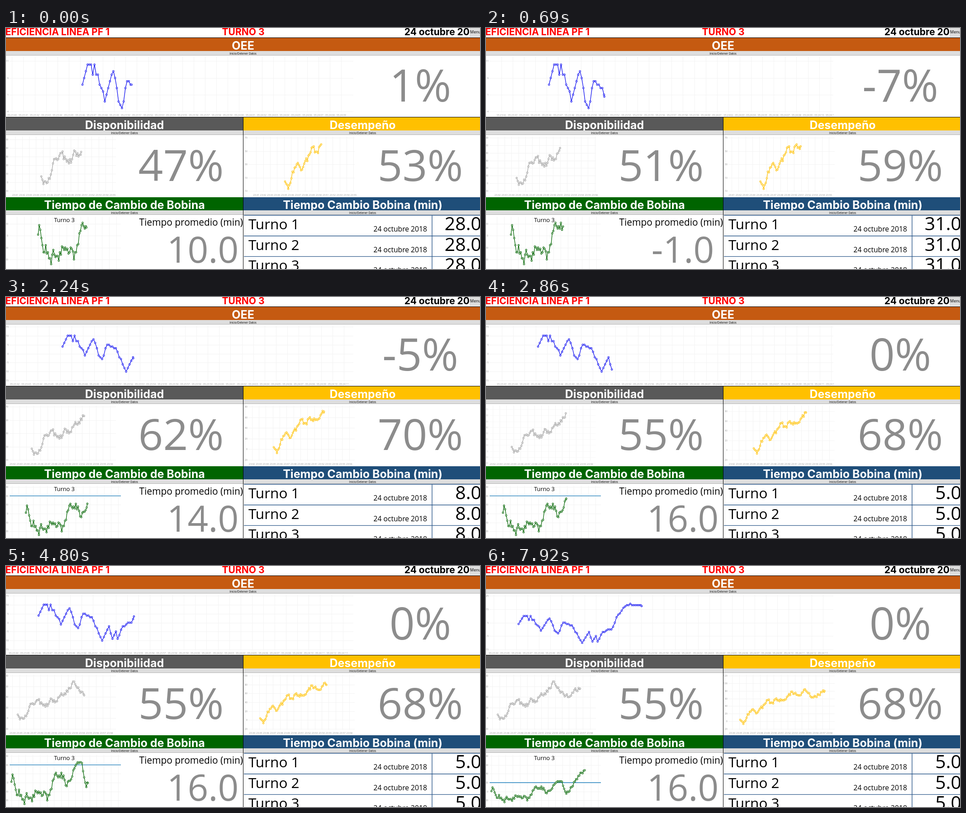
Write an HTML page with a canvas that moves like this. It is 1048 by 534 pixels and loops after 8 s.

```html
<!DOCTYPE html>
<html lang="es">
<head>
<meta charset="utf-8">
<style>
  html, body { margin: 0; width: 100%; height: 100%; overflow: hidden; background: #fff; }
  canvas { display: block; }
</style>
</head>
<body>
<canvas id="stage" width="1048" height="534"></canvas>
<script>
const ctx = document.getElementById('stage').getContext('2d');
const LOOP = 8000, RESCALE = 150, SLOWDOWN = 2560;
const SANS = '"Open Sans", "Noto Sans", sans-serif';
const HEAD = 'Inter, "Open Sans", sans-serif';
const GRID = '#f3f3f3', BIG = '#8c8c8c', RULE = '#2f5b8c';

const readings = [
  { from: 0,    oee: '1%',  avail: '47%', perf: '53%', mean: '10.0', change: '28.0' },
  { from: 310,  oee: '-7%', avail: '51%', perf: '59%', mean: '-1.0', change: '31.0' },
  { from: 2240, oee: '-5%', avail: '62%', perf: '70%', mean: '14.0', change: '8.0' },
  { from: 2460, oee: '0%',  avail: '55%', perf: '68%', mean: '16.0', change: '5.0' }
];

// shape: [sample, value]   scroll: [time, x of first sample]
// scales: [time, low, high, label step]   rate: new samples per second
const oee = {
  color: '#0a0af0', box: [0, 61, 770, 136], plot: [8, 768], top: 66, bottom: 185, axisX: 6,
  step: 3.8, second: 25.1, start: 46.2, prefix: '05:', labelY: 195,
  initial: 28.6, rate: 5.6, jitter: .8,
  scroll: [[0, 169], [690, 137], [2240, 125], [3560, 84], [4400, 72]],
  scales: [[0, -4, 12, 5], [1290, -15, 15, 5], [5120, -15, 20, 5], [6900, -15, 25, 10]],
  shape: [[0, 4], [3, 10], [5, 10], [6, 7], [7, 10], [13, -1], [16, 5], [18, 8], [21, -1],
    [23, -3], [26, 5], [29, 4], [32, 1], [37, -10], [41, -2], [43, -9], [45, -5], [46, -9],
    [49, -2], [54, 0], [58, 11], [63, 18], [73, 18]]
};
const avail = {
  color: '#a3a3a3', box: [0, 238, 250, 136], plot: [8, 243], top: 243, bottom: 361, axisX: 5,
  step: 2.35, second: 15.36, start: 44.75, prefix: '', labelY: 372,
  initial: 37.5, rate: 5.2, jitter: 4,
  scroll: [[0, 78], [690, 67], [2240, 57], [3560, 57], [4400, 26]],
  scales: [[0, -10, 52, 10], [460, -10, 60, 10], [2070, -10, 70, 20], [2480, -20, 80, 20]],
  shape: [[0, 7], [2, -2], [9, 9], [11, 22], [19, 34], [26, 22], [32, 36], [35, 30], [40, 43],
    [47, 50], [52, 69], [54, 64], [58, 52], [63, 41], [69, 43], [72, 53], [82, 56]]
};
const perf = {
  color: '#ffc000', box: [525, 238, 250, 136], plot: [536, 771], top: 243, bottom: 361, axisX: 534,
  step: 2.35, second: 15.36, start: 45.15, prefix: '', labelY: 372,
  initial: 34, rate: 5.9, jitter: 4,
  scroll: [[0, 617], [690, 606], [2240, 592], [3560, 592], [4400, 562]],
  scales: [[0, -10, 70, 20], [2070, -20, 80, 20], [2480, -20, 100, 20], [7500, -20, 120, 20]],
  shape: [[0, 4], [3, -7], [7, 19], [11, 30], [16, 22], [26, 56], [31, 47], [33, 58], [41, 55],
    [45, 67], [49, 78], [53, 70], [57, 69], [60, 83], [68, 63], [74, 70], [82, 87]]
};
const coil = {
  color: '#006400', box: [0, 415, 258, 119], plot: [8, 254], top: 421, bottom: 539, axisX: 5,
  step: 2.4, second: 15.7, start: 45, prefix: '', labelY: 550, limit: 20,
  initial: 44.5, rate: 5.4, jitter: 3.5,
  scroll: [[0, 71], [690, 54], [2240, 44], [3560, 17], [4800, 12]],
  scales: [[0, -30, 15, 10], [2070, -30, 30, 10], [6880, -40, 80, 20]],
  shape: [[0, 1], [1, 9], [5, -14], [7, -8], [12, -24], [14, -12], [19, -21], [22, -9],
    [28, -15], [30, -10], [33, -20], [40, 9], [48, 8], [51, -4], [56, 7], [59, 19], [65, 22],
    [69, -5], [74, 10], [82, 42], [90, 51]]
};

const mix = (a, b, p) => a + (b - a) * p;

// piecewise linear value through [position, value] pairs
function along(keys, at) {
  const i = Math.max(0, keys.findLastIndex(k => k[0] <= at));
  const a = keys[i], b = keys[i + 1];
  return b ? mix(a[1], b[1], (at - a[0]) / (b[0] - a[0])) : a[1];
}
// repeatable noise in -1..1
function noise(i) {
  const n = Math.sin(i * 127.1 + 3.7) * 43758.5453;
  return 2 * (n - Math.floor(n)) - 1;
}
const sample = (c, i) => {
  const isKey = c.shape.some(k => k[0] === i);
  return Math.round(along(c.shape, i) + (isKey ? 0 : c.jitter * noise(i)));
};

function text(str, x, y, size, color = '#000', align = 'center', weight = 400, family = SANS) {
  ctx.font = `${weight} ${size}px ${family}`;
  ctx.fillStyle = color;
  ctx.textAlign = align;
  ctx.fillText(str, x, y);
}
function rect(x, y, w, h, color) {
  ctx.fillStyle = color;
  ctx.fillRect(x, y, w, h);
}
function line(x1, y1, x2, y2, color, width = 1) {
  ctx.strokeStyle = color;
  ctx.lineWidth = width;
  ctx.beginPath();
  ctx.moveTo(x1, y1);
  ctx.lineTo(x2, y2);
  ctx.stroke();
}
function banner(title, x, y, w, h, color) {
  const mid = x + w / 2, strip = y + h;
  rect(x, y, w, h, color);
  text(title, mid, strip - 3.5, 25, '#fff', 'center', 700, HEAD);
  rect(x, strip, w, 10, '#dedede');
  rect(x, strip + 9, w, 1, '#b4b4b4');
  text('Inicio/Detener Datos', mid, strip + 7.5, 6.2);
}

function drawChart(c, t) {
  const x0 = along(c.scroll, t);
  const last = c.initial + c.rate * t / 1000;
  const si = c.scales.findLastIndex(s => s[0] <= t);
  const now = c.scales[si], old = c.scales[si - 1] || now;
  const p = si ? Math.min(1, (t - now[0]) / RESCALE) : 1;
  const toY = (v, [, low, high]) => mix(c.bottom, c.top, (v - low) / (high - low));
  const yOf = v => mix(toY(v, old), toY(v, now), p);

  ctx.save();
  ctx.beginPath();
  ctx.rect(...c.box);
  ctx.clip();

  for (let s = 35; s < 80; s++) {
    const x = x0 + (s - c.start) * c.second;
    if (x < c.plot[0] + 3 || x > c.plot[1] - 2) continue;
    rect(Math.round(x), c.top - 3, 1, c.bottom - c.top + 5, GRID);
    const clock = `${23 + Math.floor(s / 60)}:${String(s % 60).padStart(2, '0')}`;
    text(c.prefix + clock, x, c.labelY, 5.3, '#999');
  }
  for (const [scale, alpha] of [[old, 1 - p], [now, p]]) {
    ctx.globalAlpha = alpha;
    for (let v = scale[1]; v <= scale[2] && alpha; v += scale[3]) {
      rect(c.plot[0], Math.round(yOf(v)), c.plot[1] - c.plot[0], 1, GRID);
      text(v, c.axisX, yOf(v) + 2, 5.5, '#999', 'right');
    }
  }
  ctx.globalAlpha = 1;
  if (c.limit) line(c.plot[0], yOf(c.limit), c.plot[1], yOf(c.limit), '#1c7fbd', 1.3);

  // the newest sample slides out of the one before it
  const points = [];
  for (let i = 0; i < last + 1; i++) {
    const grow = Math.min(1, last - i + 1);
    const v = mix(sample(c, Math.max(0, i - 1)), sample(c, i), grow);
    points.push([x0 + Math.min(i, last) * c.step, yOf(v)]);
  }
  ctx.strokeStyle = c.color;
  ctx.lineWidth = 1.25;
  ctx.lineJoin = 'round';
  ctx.beginPath();
  points.forEach(q => ctx.lineTo(...q));
  ctx.stroke();
  ctx.fillStyle = '#fff';
  ctx.lineWidth = 1.1;
  for (const [x, y] of points) {
    ctx.beginPath();
    ctx.arc(x, y, 1.7, 0, 7);
    ctx.fill();
    ctx.stroke();
  }
  ctx.restore();
}

function drawFrame(t) {
  const r = readings.findLast(item => item.from <= t);
  rect(0, 0, 1048, 534, '#fff');

  text('EFICIENCIA LINEA PF 1', 229, 16, 21, '#f00', 'right', 700, HEAD);
  text('TURNO 3', 524.5, 16, 21, '#f00', 'center', 700, HEAD);
  text('24 octubre 20', 1025, 16, 21, '#000', 'right', 700, HEAD);
  rect(1025, 0, 23, 20, '#ddd');
  text('Menu', 1026, 12, 9, '#000', 'left');
  rect(0, 21, 1048, 1, '#000');

  banner('OEE', 0, 22, 1048, 29, '#c55a11');
  drawChart(oee, t);
  text(r.oee, 916, 163, 98, BIG);

  rect(0, 197, 1048, 1, '#000');
  banner('Disponibilidad', 0, 198, 524, 29, '#595959');
  banner('Desempeño', 525, 198, 527, 29, '#ffc000');
  drawChart(avail, t);
  drawChart(perf, t);
  text(r.avail, 387, 339, 96, BIG);
  text(r.perf, 916, 339, 96, BIG);

  banner('Tiempo de Cambio de Bobina', 0, 375, 524, 29, '#006400');
  banner('Tiempo Cambio Bobina (min)', 525, 375, 527, 29, '#1f4e79');
  drawChart(coil, t);
  text('Turno 3', 129, 430, 12.8);
  text('Tiempo promedio (min)', 524, 438, 20.9, '#000', 'right');
  text(r.mean, 435, 520, 80, BIG);

  for (let row = 0; row < 3; row++) {
    const y = 415 + row * 45.7;
    line(526, y, 1048, y, RULE, 1.4);
    text('Turno ' + (row + 1), 536, y + 31, 31.5, '#000', 'left');
    text('24 octubre 2018', 931, y + 36, 15.7, '#000', 'right');
    text(r.change, 1051, y + 33, 41, '#000', 'right');
  }
  line(942, 415, 942, 534, RULE, 1.4);
  rect(524, 197, 1, 337, '#000');
}

function tick() {
  const t = performance.now() % LOOP;
  // the dashboard repaints less often once it has settled
  drawFrame(t - t % (t < SLOWDOWN ? 80 : 320));
  requestAnimationFrame(tick);
}
tick();
</script>
</body>
</html>
```
